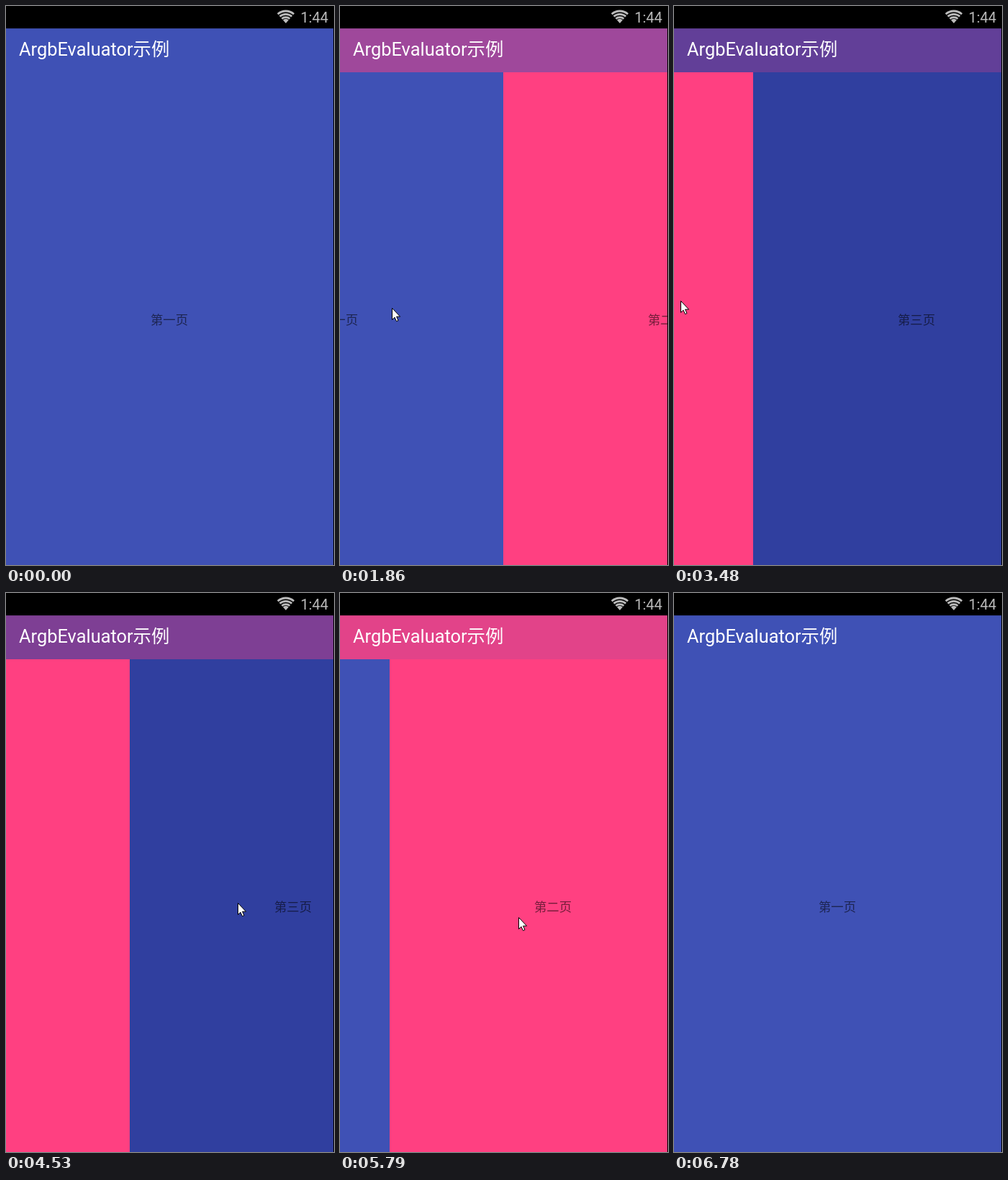
These frames come from a looping animation (456 by 776 pixels, 7.83 s). An HTML page:

```html
<!DOCTYPE html>
<html lang="zh">
<head>
<meta charset="utf-8">
<title>ArgbEvaluator示例</title>
<style>
  html, body { margin: 0; width: 100%; height: 100%; overflow: hidden; background: #000; }
  svg { display: block; width: 456px; height: 776px; font-family: Roboto, "Noto Sans CJK SC", "Noto Sans CJK", sans-serif; }
  .label { font-size: 17.4px; fill: rgba(0, 0, 0, .54); text-anchor: middle; }
</style>
</head>
<body>
<svg viewBox="0 0 456 776">
  <g id="pages"></g>
  <rect id="toolbar" y="31" width="455" height="61"/>
  <rect y="31" width="455" height="1" opacity=".15"/>
  <text x="18" y="69" font-size="25.4" fill="#fff">ArgbEvaluator示例</text>
  <rect width="456" height="31"/>
  <rect x="455" width="1" height="776"/>
  <g id="wifi" fill="none" stroke="#bbb"></g>
  <text x="409.5" y="23" font-size="20" fill="#bbb">1:44</text>
  <path id="cursor" d="M.5.5V16.5L4 13.2 6.5 18.7 9 17.6 6.6 12.2H11.6Z" fill="#fff" stroke="#000"/>
</svg>
<script>
const LOOP = 7830, STEP = 30, WIDTH = 455, SLOP = 23, SETTLE = 600;
const $ = id => document.getElementById(id);

const pages = [
  { text: '第一页', color: [63, 81, 181] },
  { text: '第二页', color: [255, 64, 129] },
  { text: '第三页', color: [48, 63, 159] },
];

// Pointer path: time, x, y
const path = [
  [300, 460, 350], [660, 400, 344], [1110, 377, 371], [1350, 323, 408],
  [1860, 72, 419], [1920, 55, 420], [2040, 50, 422], [2580, 414, 404],
  [2820, 414, 404], [2940, 377, 410], [3480, 9, 409], [3540, 2, 410],
  [3720, 1, 418], [4230, 127, 430], [4530, 322, 430], [4680, 410, 432],
  [4800, 444, 434], [4920, 440, 436], [5400, 60, 452], [5550, 60, 452],
  [5670, 156, 460], [5790, 248, 450], [6000, 430, 446], [6300, 470, 444],
];

const swipes = [
  { press: 1350, release: 1920, from: 0, to: 1 },
  { press: 2940, release: 3540, from: 1, to: 2 },
  { press: 4230, release: 4680, from: 2, to: 1 },
  { press: 5670, release: 6000, from: 1, to: 0 },
];

const clamp = (v, lo, hi) => Math.min(hi, Math.max(lo, v));
const mix = (a, b, k) => a + (b - a) * k;
const slope = (i, axis) => (path[i + 1][axis] - path[i][axis]) / (path[i + 1][0] - path[i][0]);

// Tangent that never overshoots: zero where the direction turns
function tangent(i, axis) {
  if (i === 0 || i === path.length - 1) return 0;
  const a = slope(i - 1, axis), b = slope(i, axis);
  return a * b > 0 ? 2 * a * b / (a + b) : 0;
}

function pointer(t, axis) {
  const last = path.length - 1;
  if (t <= path[0][0]) return path[0][axis];
  if (t >= path[last][0]) return path[last][axis];
  const i = path.findIndex(key => key[0] > t) - 1;
  const span = path[i + 1][0] - path[i][0], k = (t - path[i][0]) / span;
  const ease = k * k * (3 - 2 * k);
  return mix(path[i][axis], path[i + 1][axis], ease)
    + span * k * (1 - k) * ((1 - k) * tangent(i, axis) - k * tangent(i + 1, axis));
}

function dragged({ press, from, to }, t) {
  const direction = to - from;
  const distance = direction * (pointer(press, 1) - pointer(t, 1)) - SLOP;
  return from + direction * clamp(distance / WIDTH, 0, 1);
}

function pagePosition(t) {
  const swipe = swipes.filter(s => s.press <= t).pop();
  if (!swipe) return 0;
  if (t <= swipe.release) return dragged(swipe, t);
  const k = Math.min(1, (t - swipe.release) / SETTLE);
  return mix(dragged(swipe, swipe.release), swipe.to, 1 - (1 - k) ** 5);
}

function render(t) {
  const position = pagePosition(t);
  pages.forEach((page, i) => {
    const x = Math.round((i - position) * WIDTH);
    page.node.setAttribute('transform', `translate(${x})`);
  });
  const i = Math.min(1, Math.floor(position));
  const color = pages[i].color.map((c, n) => Math.round(mix(c, pages[i + 1].color[n], position - i)));
  $('toolbar').setAttribute('fill', `rgb(${color})`);
  const [x, y] = [1, 2].map(axis => Math.round(pointer(t, axis)));
  $('cursor').setAttribute('transform', `translate(${x} ${y})`);
}

$('pages').innerHTML = pages.map(({ text, color }) =>
  `<g><rect y="31" width="${WIDTH}" height="745" fill="rgb(${color})"/><text class="label" x="227" y="441.5">${text}</text></g>`
).join('');
pages.forEach((page, i) => page.node = $('pages').children[i]);

// Wi-Fi fan: concentric bands around the bottom tip
$('wifi').innerHTML = [[17, 2.8], [12.7, 2.8], [8.4, 2.8], [3, 6]].map(([r, width]) => {
  const dx = r * .66, y = 24 - r * .75;
  return `<path d="M${389 - dx} ${y}A${r} ${r} 0 0 1 ${389 + dx} ${y}" stroke-width="${width}"/>`;
}).join('');

const start = performance.now();
function tick() {
  const t = (performance.now() - start) % LOOP;
  render(Math.floor(t / STEP) * STEP);
  requestAnimationFrame(tick);
}
tick();
</script>
</body>
</html>
```
